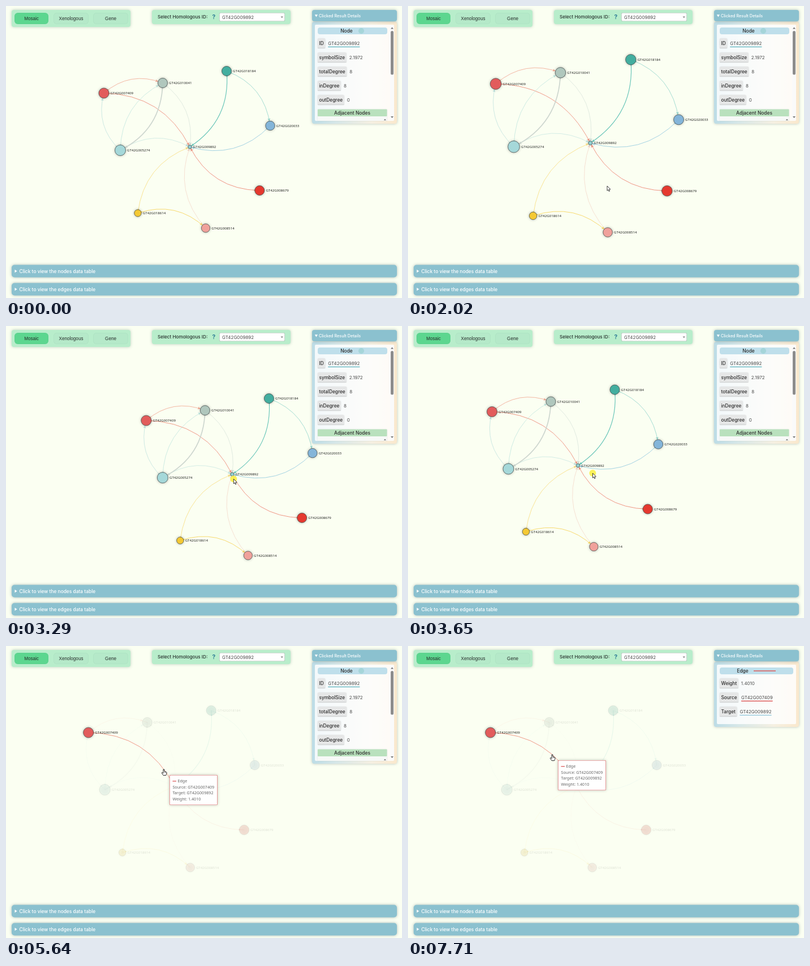
Animation, 700 px wide and 516 px high, one loop 8000 ms. Source, as an HTML page with a canvas:

```html
<!DOCTYPE html>
<html lang="en">
<head>
<meta charset="utf-8">
<title>Homologous gene network</title>
<style>
html, body { margin: 0; width: 100%; height: 100%; overflow: hidden; background: #fbfff2; }
canvas { display: block; width: 700px; height: 516px; }
</style>
</head>
<body>
<canvas id="stage"></canvas>
<script>
const W = 700, H = 516, LOOP = 8000;
const canvas = document.getElementById('stage');
const ctx = canvas.getContext('2d');
const dpr = window.devicePixelRatio || 1;
canvas.width = W * dpr;
canvas.height = H * dpr;

const UI = 'Inter, sans-serif';
const CHART = '"Noto Sans", "Open Sans", sans-serif';
const BUTTON = '"Liberation Sans", Arial, sans-serif';
const BLUE = '#8bc1cf', GREEN = '#b8edcb';

// id, x, y, radius, colour
const nodes = {
  A: ['GT42G010041', 277, 136, 8.5, '#b0c7bd'],
  B: ['GT42G007409', 173, 154, 9, '#e25c5c'],
  C: ['GT42G018184', 390, 115, 8.5, '#43ae9f'],
  D: ['GT42G020033', 467, 211.5, 8.2, '#84b5d9'],
  E: ['GT42G009892', 325, 249, 3.2, '#92d0d2'],
  F: ['GT42G005274', 202, 255, 9.5, '#a5d8d9'],
  G: ['GT42G008679', 448.3, 326, 8.5, '#e5392f'],
  H: ['GT42G018614', 233, 366, 6.2, '#f4c934'],
  I: ['GT42G008514', 353, 392.5, 7.6, '#f0a19b']
};

// from, to, colour, width
const edges = [
  ['H', 'E', '#f8dc7c', 0.8], ['F', 'E', '#b9dfdc', 0.6], ['B', 'E', '#ee8f7c', 0.9],
  ['A', 'E', '#cfdcd4', 0.6], ['C', 'E', '#62c3b6', 1.1], ['D', 'E', '#9acde0', 0.9],
  ['G', 'E', '#ee8a78', 0.9], ['I', 'E', '#f3d3c4', 0.7], ['B', 'A', '#f0a48f', 0.8],
  ['F', 'B', '#b9dfdc', 0.7], ['F', 'A', '#b9e2dc', 0.7], ['A', 'F', '#cdd6cf', 1.7],
  ['C', 'D', '#8fd3c9', 0.8], ['H', 'I', '#f6d560', 0.9]
];

const links = {
  F: { weight: '1.2169', color: '#8fccc9' },
  B: { weight: '1.4010', color: '#dc5b5b' }
};

const zoomIn = [770, 860, 950, 1040, 1130, 1220];
const zoomOut = [1670, 1740, 1810, 1880, 2020, 2170];
const drag = [
  [2400, 0, 0], [2820, 94.4, 48.3], [2930, 150, 46], [3010, 186, 37], [3100, 184, 36],
  [3250, 100, 18], [3400, 8, 0], [3520, -32, -4], [3650, -24.5, -2.5], [3760, -27.3, -1]
];
const pointerIn = [[150, 634, 508], [480, 330, 303], [620, 352, 318], [2170, 352, 318], [2400, 352, 262]];
const pointerOut = [
  [3760, 324.7, 261], [3960, 324.7, 261], [4300, 296, 249], [4650, 293, 245], [4790, 293, 245],
  [4950, 285, 226], [5300, 270, 207], [5540, 279, 218], [5640, 279, 218], [5850, 268, 223],
  [6150, 264, 235], [6460, 264, 235], [6700, 264, 222], [6950, 279, 218], [7400, 279, 218], [7700, 255, 192]
];
const presses = [[2400, 3790], [6300, 6420], [7310, 7400]];
const focusLog = [[0, ''], [4300, 'F'], [4900, 'B'], [5680, ''], [6050, 'F'], [6500, ''], [6880, 'B']];

const clamp = v => Math.max(0, Math.min(1, v));
const mix = (a, b, k) => a + (b - a) * k;
const easeOut = k => 1 - (1 - clamp(k)) ** 3;

function along(keys, t) {
  let i = 1;
  while (i < keys.length - 1 && keys[i][0] < t) i++;
  const a = keys[i - 1], b = keys[i], k = clamp((t - a[0]) / (b[0] - a[0]));
  return [mix(a[1], b[1], k), mix(a[2], b[2], k)];
}

function pointer(t) {
  if (t < 2400) return along(pointerIn, t);
  if (t >= 3760) return along(pointerOut, t);
  // the graph trails the pointer a little
  const [x, y] = along(drag, t + 40 * clamp((t - 2400) / 100));
  return [352 + x, 262 + y];
}

function focusAt(t) {
  let i = focusLog.length - 1;
  while (focusLog[i][0] > t) i--;
  return { now: focusLog[i][1], prev: i ? focusLog[i - 1][1] : '', age: t - focusLog[i][0] };
}

function text(s, x, y, size, color, font = UI, weight = 400, align = 'left') {
  ctx.font = `${weight} ${size}px ${font}`;
  ctx.textAlign = align;
  ctx.fillStyle = color;
  ctx.fillText(s, x, y + size * 0.36);
}

function box(x, y, w, h, r, fill, shadow, blur = 5) {
  ctx.save();
  if (shadow) {
    ctx.shadowColor = shadow;
    ctx.shadowBlur = blur * dpr;
  }
  ctx.fillStyle = fill;
  ctx.beginPath();
  ctx.roundRect(x, y, w, h, r);
  ctx.fill();
  ctx.restore();
}

function poly(points, fill, stroke, width = 0.8) {
  ctx.beginPath();
  for (let i = 0; i < points.length; i += 2) ctx.lineTo(points[i], points[i + 1]);
  ctx.closePath();
  ctx.fillStyle = fill;
  ctx.fill();
  if (stroke) {
    ctx.strokeStyle = stroke;
    ctx.lineWidth = width;
    ctx.stroke();
  }
}

function disc(x, y, r, fill) {
  ctx.beginPath();
  ctx.arc(x, y, r, 0, 7);
  ctx.fillStyle = fill;
  ctx.fill();
}

function rule(x1, x2, y, color, width) {
  ctx.fillStyle = color;
  ctx.fillRect(x1, y - width / 2, x2 - x1, width);
}

function drawEdge(a, b, color, width, size) {
  const cx = (a.x + b.x) / 2 + 0.3 * (b.y - a.y);
  const cy = (a.y + b.y) / 2 - 0.3 * (b.x - a.x);
  const at = k => {
    const u = 1 - k;
    return [u * u * a.x + 2 * u * k * cx + k * k * b.x, u * u * a.y + 2 * u * k * cy + k * k * b.y];
  };
  // parameter where the curve crosses the rim of a node
  const rim = (node, inside, outside) => {
    for (let i = 0; i < 14; i++) {
      const m = (inside + outside) / 2, [x, y] = at(m);
      if (Math.hypot(x - node.x, y - node.y) < node.r) inside = m; else outside = m;
    }
    return outside;
  };
  ctx.strokeStyle = color;
  ctx.lineWidth = width;
  ctx.beginPath();
  ctx.moveTo(a.x, a.y);
  ctx.quadraticCurveTo(cx, cy, b.x, b.y);
  ctx.stroke();

  const k0 = rim(a, 0, 0.5), k1 = rim(b, 1, 0.5);
  disc(...at(k0), 1.3, color);
  const [x, y] = at(k1), [px, py] = at(k1 - 0.03);
  ctx.save();
  ctx.translate(x, y);
  ctx.rotate(Math.atan2(y - py, x - px));
  poly([0, 0, -5 * size, -2.4 * size, -3.6 * size, 0, -5 * size, 2.4 * size], color);
  ctx.restore();
}

function drawGraph(t) {
  const past = list => list.filter(v => v <= t).length;
  const z = 1.1 ** (past(zoomIn) - past(zoomOut));
  const [ox, oy] = along(drag, t);
  const f = focusAt(t), k = easeOut(f.age / 300);
  const fade = lit => mix(lit(f.prev) ? 1 : 0.13, lit(f.now) ? 1 : 0.13, k);

  const put = {};
  for (const key in nodes) {
    const [id, x, y, r, color] = nodes[key];
    put[key] = { id, color, x: 352 + (x - 352) * z + ox, y: 318 + (y - 318) * z + oy, r: r * z ** 0.887 };
  }
  ctx.save();
  ctx.beginPath();
  ctx.rect(0, 0, W, 448);
  ctx.clip();
  for (const [from, to, color, width] of edges) {
    ctx.globalAlpha = fade(g => !g || (g === from && to === 'E'));
    drawEdge(put[from], put[to], color, width, z ** 0.3);
  }
  for (const key in put) {
    const n = put[key];
    ctx.globalAlpha = fade(g => !g || key === g || key === 'E');
    ctx.save();
    ctx.shadowColor = 'rgba(0,0,0,.32)';
    ctx.shadowBlur = 5 * dpr;
    disc(n.x, n.y, n.r, n.color);
    ctx.restore();
    ctx.strokeStyle = '#3c4444';
    ctx.lineWidth = 0.7;
    ctx.stroke();
  }
  for (const key in put) {
    const n = put[key];
    ctx.globalAlpha = fade(g => !g || key === g || key === 'E');
    text(n.id, n.x + n.r + 2.6, n.y, 6.15, '#222', CHART);
  }
  ctx.restore();
}

function detailRow(label, value, y, underline) {
  ctx.font = `500 8.3px ${UI}`;
  const w = ctx.measureText(label).width + 5;
  box(551, y - 8.5, w, 17, 1.5, '#e6e7e7', 'rgba(0,0,0,.15)', 2);
  rule(551, 551 + w, y + 8.2, '#c9cbcb', 0.8);
  text(label, 553.5, y, 8.3, '#2c2c2c', UI, 500);
  text(value, 556 + w, y, 8, '#4a4a4a');
  if (underline) {
    const end = 556 + w + ctx.measureText(value).width;
    rule(556 + w, end, y + 6.3, underline, 1.5);
  }
}

function drawDetails(t) {
  const pick = t >= 7380 ? 'B' : t >= 6460 ? 'F' : '';
  const h = pick ? 115 : 180;
  const wash = ctx.createLinearGradient(541, 0, 691, 0);
  wash.addColorStop(0, '#bcdce6');
  wash.addColorStop(0.28, '#d6e7e8');
  wash.addColorStop(0.7, '#f5f0e2');
  wash.addColorStop(1, '#fae8cd');
  box(541, 28, 150, h, 4, wash, 'rgba(60,80,80,.35)');
  box(546, 33, 140, h - 10, 2, 'rgba(255,255,255,.82)');
  box(541, 7, 150, 20, 4, BLUE, 'rgba(60,90,100,.4)');
  poly([545.8, 15.3, 551, 15.3, 548.4, 19.4], '#fff');
  text('Clicked Result Details', 553, 17, 7.2, '#fff', UI, 500);

  if (pick) {
    const { weight, color } = links[pick];
    box(551, 38, 130, 12, 4, '#bfdfeb');
    text('Edge', 591.5, 44, 8.3, '#2c2c2c', UI, 500, 'center');
    rule(611, 650, 44, color, 1.5);
    detailRow('Weight', weight, 66);
    detailRow('Source', nodes[pick][0], 91, color);
    detailRow('Target', nodes.E[0], 116, '#9ccbdc');
    return;
  }
  box(551, 38, 123, 12, 4, '#bfdfeb');
  text('Node', 602, 44, 8.4, '#2c2c2c', UI, 500, 'center');
  disc(628, 44, 5, '#a5d5d9');
  detailRow('ID', nodes.E[0], 66, '#72bcc5');
  detailRow('symbolSize', '2.1972', 91);
  detailRow('totalDegree', '8', 116);
  detailRow('inDegree', '8', 141);
  detailRow('outDegree', '0', 166);
  box(551, 182.5, 122.5, 20.5, 1, '#f7f9f7', 'rgba(0,0,0,.12)', 2);
  box(551, 182.5, 122.5, 12.5, 1, '#b9e1bd');
  text('Adjacent Nodes', 612, 188.7, 8.4, '#2c2c2c', UI, 500, 'center');
  poly([667.8, 202, 672, 202, 669.9, 199.6], '#777');
  box(679, 34, 7, 168, 0, '#fafafa');
  box(680, 44, 5, 77.5, 2.5, '#8c8c8c');
  poly([680, 40.6, 685, 40.6, 682.5, 37.6], '#777');
  poly([680, 195, 685, 195, 682.5, 198], '#777');
}

function drawButton(label, x, w, fill, edge) {
  box(x, 12, w, 20, 6, edge);
  box(x + 0.5, 12.5, w - 1, 19, 5.5, fill);
  text(label, x + w / 2, 22, 8.15, '#262d2a', BUTTON, 400, 'center');
}

function drawBar(label, y, h) {
  box(10, y, 681, h, 5, BLUE, 'rgba(60,90,100,.4)');
  poly([15.5, y + h / 2 - 2.8, 15.5, y + h / 2 + 2.8, 19.5, y + h / 2], '#fff');
  text(label, 23.5, y + h / 2, 8.4, '#fff', UI, 500);
}

function drawControls() {
  box(10, 7, 210, 30, 4, GREEN, 'rgba(70,110,90,.35)');
  drawButton('Mosaic', 15, 60, '#5cd68f', '#58cf8a');
  drawButton('Xenologous', 84, 62, '#b5e9c9', '#a9dfbf');
  drawButton('Gene', 154, 62, '#b5e9c9', '#a9dfbf');

  box(258, 7, 245, 25, 4, GREEN, 'rgba(70,110,90,.35)');
  text('Select Homologous ID:', 268, 19.5, 8.15, '#26302c', UI, 500);
  text('?', 367.3, 19.5, 10.5, '#20708f', UI, 600, 'center');
  box(377, 12, 116, 15, 2, '#a9b5ae');
  box(377.6, 12.6, 114.8, 13.8, 1.6, '#fff');
  text(nodes.E[0], 382, 19.7, 8, '#4a4a4a');
  poly([485.6, 18.6, 490, 18.6, 487.8, 21.2], '#888');

  drawBar('Click to view the nodes data table', 457.5, 22);
  drawBar('Click to view the edges data table', 489.5, 22);
}

function drawTip(t, x, y) {
  const f = focusAt(t), key = f.now || f.prev;
  const alpha = f.now ? (f.prev ? 1 : clamp(f.age / 200)) : 1 - clamp(f.age / 200);
  if (!key || !alpha) return;
  const { weight, color } = links[key];
  ctx.save();
  ctx.globalAlpha = alpha;
  ctx.translate(x + 10, y + 10);
  box(0, 0, 85, 53, 2, color, 'rgba(0,0,0,.25)', 5);
  box(0.6, 0.6, 83.8, 51.8, 1.5, '#fff');
  rule(5.5, 12, 10.8, color, 1.3);
  text('Edge', 14.5, 10.8, 7.15, '#666', CHART);
  const lines = ['Source: ' + nodes[key][0], 'Target: ' + nodes.E[0], 'Weight: ' + weight];
  lines.forEach((s, i) => text(s, 5.5, 21.3 + 10.5 * i, 7.15, '#666', CHART));
  ctx.restore();
}

function drawPointer(t, x, y) {
  if (t < 150) return;
  if (presses.some(([a, b]) => t >= a && t < b)) disc(x, y, 6, 'rgba(250,240,70,.88)');
  ctx.save();
  ctx.translate(x, y);
  ctx.lineJoin = 'round';
  if (focusAt(t).now) {
    poly([-0.9, 0, 0.9, 0, 1.1, 3.6, 4.4, 4.6, 5.2, 5.8, 4.6, 8.4, 3.8, 10.6, -0.8, 10.6,
      -3.6, 6.6, -3.4, 5.6, -2.4, 5.6, -1, 7], '#fff', '#111', 0.9);
    for (const fx of [1.3, 2.9]) {
      ctx.fillStyle = '#111';
      ctx.fillRect(fx, 4.2, 0.5, 2);
    }
  } else {
    poly([0, 0, 0, 8.4, 1.9, 6.7, 3.2, 9.6, 4.6, 9, 3.3, 6.2, 5.9, 6], '#fff', '#111', 0.8);
  }
  ctx.restore();
}

function draw(t) {
  ctx.setTransform(dpr, 0, 0, dpr, 0, 0);
  ctx.fillStyle = '#fbfff2';
  ctx.fillRect(0, 0, W, H);
  const [x, y] = pointer(t);
  drawGraph(t);
  drawControls();
  drawDetails(t);
  drawTip(t, x, y);
  drawPointer(t, x, y);
}

const start = performance.now();
function tick() {
  draw((performance.now() - start) % LOOP);
  requestAnimationFrame(tick);
}
tick();
</script>
</body>
</html>
```
